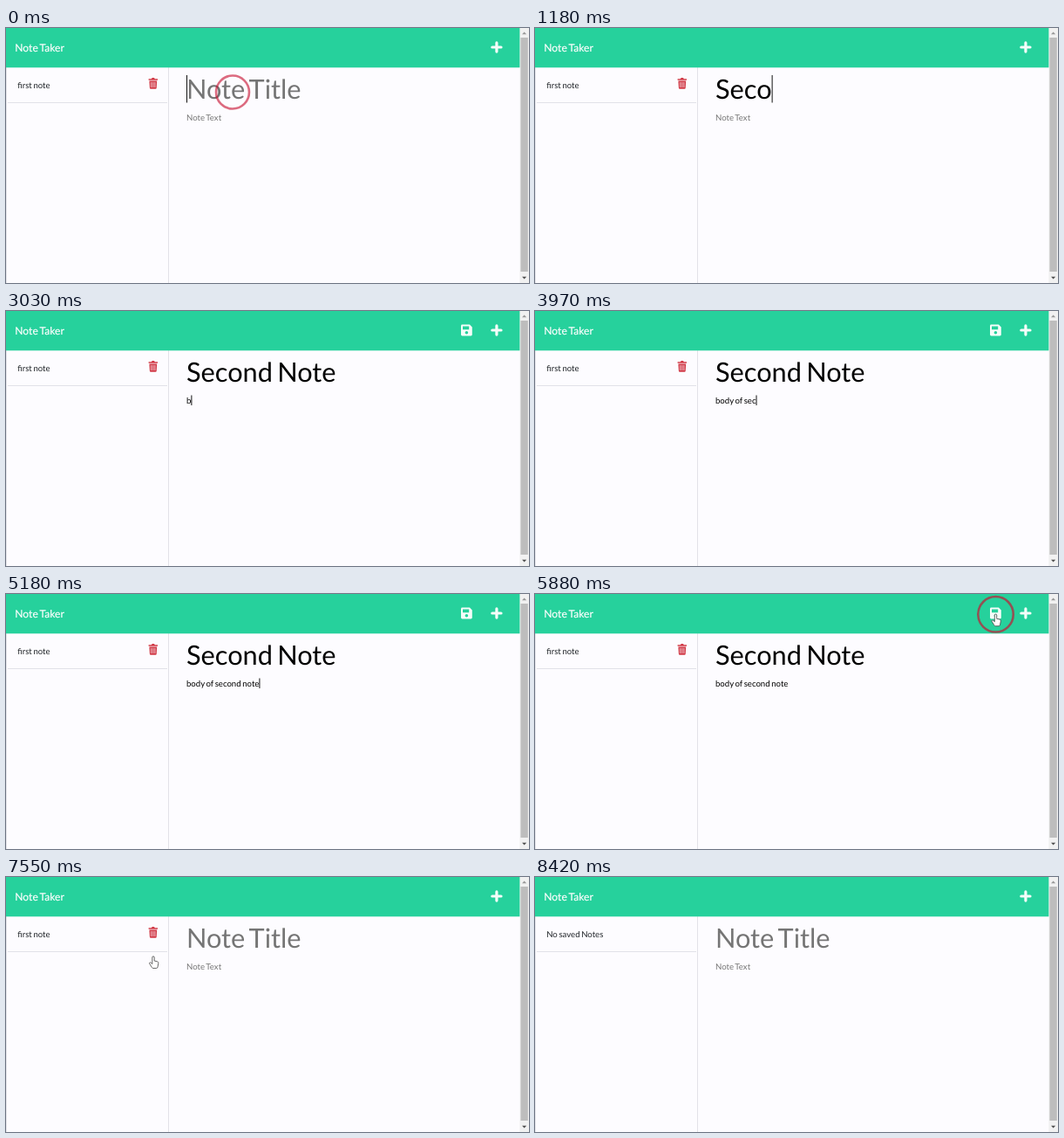
These frames come from a looping animation (600 by 292 pixels, 8450 ms). An HTML page:

```html
<!DOCTYPE html>
<html lang="en">
<head>
<meta charset="utf-8">
<title>Note Taker</title>
<style>
html, body { margin: 0; width: 100%; height: 100%; overflow: hidden; background: #fdfcff; }
svg { display: block; width: 600px; height: 292px; }
text { font: 9.6px Lato, sans-serif; word-spacing: -.085em; white-space: pre; text-rendering: geometricPrecision; fill: #212529; }
#title { font-size: 30.72px; }
.brand { font-size: 12.1px; fill: #fff; stroke: #fff; stroke-width: .2; }
.line { stroke: #e2e2e8; }
</style>
</head>
<body>
<svg viewBox="0 0 600 292">
  <defs>
    <g id="trash">
      <path fill="#d23c49" d="M0 1.2h3.2l.8-1.2h2.4l.8 1.2h3.2v1.5h-10.4zM.8 3.5h8.8l-.5 8.2q-.1 1-1.1 1h-5.6q-1 0-1.1-1z"/>
      <path stroke="#fdfcff" stroke-width=".7" d="M3.1 5v6M5.2 5v6M7.3 5v6"/>
    </g>
  </defs>
  <rect width="600" height="292" fill="#fdfcff"/>
  <path class="line" d="M.5 45V292M186.5 45V292M2 85.5H185"/>
  <rect x="589.4" width="10.6" height="292" fill="#f1f1f1"/>
  <rect x="590.4" y="11" width="8.4" height="268" fill="#bdbdbd"/>
  <path fill="#999" d="M592 7.2l2.6-2.8 2.6 2.8z"/>
  <path fill="#505050" d="M592 284.8l2.6 2.8 2.6-2.8z"/>

  <rect width="589.4" height="45.3" fill="#26d19c"/>
  <text class="brand" x="10.3" y="26.5">Note Taker</text>
  <path stroke="#f4fdf9" stroke-width="3.2" stroke-linecap="round" d="M557.8 22H568M562.9 16.9V27.1"/>
  <path id="save" fill="#f4fdf9" fill-rule="evenodd" transform="translate(522 15.6)" d="M1.4 0h8.6l2.8 2.8v8.6a1.4 1.4 0 0 1-1.4 1.4h-10a1.4 1.4 0 0 1-1.4-1.4v-10a1.4 1.4 0 0 1 1.4-1.4zM2 2v3.6h7.2v-3.6zM4.6 9.1a1.8 1.8 0 1 0 3.6 0a1.8 1.8 0 1 0-3.6 0z"/>

  <text id="first" x="13.2" y="69"></text>
  <use id="firstBin" href="#trash" x="163.6" y="57"/>
  <g id="second">
    <text x="13.2" y="109.2">Second Note</text>
    <use href="#trash" x="163.6" y="97.3"/>
    <path class="line" d="M2 126H185"/>
  </g>

  <text id="title" x="207" y="80.6"></text>
  <text id="body" x="207" y="106"></text>
  <rect id="caret" width="1" fill="#111"/>

  <circle id="ring" fill="none" stroke="#c81432" stroke-width="2.6"/>
  <g id="cursor" fill="#fff" stroke="#444" stroke-width=".8" stroke-linejoin="round">
    <path id="hand" d="M-1.2 1a1.2 1.2 0 0 1 2.4 0v4l3.4.7q1.4.4 1.2 1.9l-.7 4.1q-.3 1.7-1.4 1.7h-3.8q-1 0-1.6-1l-2.6-4.2q-.5-1 .4-1.4.8-.2 1.5.6l1.2 1.1z"/>
    <path id="arrow" d="M0 0v11l2.5-2.4 1.7 3.8 1.6-.7-1.7-3.7h3.5z"/>
  </g>
</svg>
<script>
// All times in ms
const LOOP = 8450, BLINK = 530, KEY = 95, MOVE = 380, PRESS = 220;
const FOCUS = -120, TAB = 2790, BLUR = 5700, CLEAR = 5960, SAVED = 6060, DROP_SECOND = 7440, DROP_FIRST = 8040;

// Bursts of typing: text and time of the first key
const titleBursts = [["Second ", 880], ["Note", 1600]];
const bodyBursts = [["body of s", 2940], ["econ", 3850], ["d note", 4270]];

const field = { x: 260, y: 73.5 }, disk = { x: 528.5, y: 23.3 }, list = { x: 176, y: 115.5 };
const bin1 = { x: 169, y: 65 }, bin2 = { x: 169, y: 105 };
const moves = [[5180, disk], [6100, list], [6850, bin2], [7400, bin1], [7960, field]];
const clicks = [[FOCUS, field], [5810, disk], [7220, bin2], [7790, bin1]];

const $ = id => document.getElementById(id);
const show = (id, on) => $(id).style.display = on ? "" : "none";
const set = (id, attrs) => Object.entries(attrs).forEach(([k, v]) => $(id).setAttribute(k, v));
const clamp = (v, lo, hi) => Math.min(hi, Math.max(lo, v));
const mix = (a, b, u) => a + (b - a) * u;

function type(bursts, t, focus) {
  let text = "", last = focus;
  for (const [s, start] of bursts) {
    const n = clamp(Math.floor((t - start) / KEY) + 1, 0, s.length);
    text += s.slice(0, n);
    if (n) last = start + (n - 1) * KEY;
  }
  return { text, last };
}

function drawField(id, value, placeholder) {
  $(id).textContent = value || placeholder;
  $(id).style.fill = value ? "#000" : "#757575";
}

function drawCaret(t, inTitle, { text, last }) {
  const on = t < BLUR && Math.floor((t - last) / BLINK) % 2 === 0;
  show("caret", on);
  if (!on) return;
  const width = text ? $(inTitle ? "title" : "body").getComputedTextLength() : 0;
  set("caret", { x: 207 + width, y: inTitle ? 54 : 96.5, height: inTitle ? 31.5 : 11.5 });
}

function drawRing(t) {
  const click = clicks.find(([start]) => t >= start && t < start + PRESS);
  show("ring", click);
  if (!click) return;
  const [start, { x, y }] = click, u = (t - start) / PRESS;
  set("ring", { cx: x, cy: y, r: 22 - 5.5 * u, opacity: 0.68 * (1 - u ** 4) });
}

function drawCursor(t) {
  let { x, y } = field;
  for (const [start, to] of moves) {
    const u = clamp((t - start) / MOVE, 0, 1), e = u * u * (3 - 2 * u);
    x = mix(x, to.x, e);
    y = mix(y, to.y, e);
  }
  const header = y < 45, hand = header ? x > 515 : x < 187;
  show("cursor", header || x < 202); // not visible over the text fields
  show("hand", hand);
  show("arrow", !hand);
  set("cursor", { transform: `translate(${x} ${y})` });
}

function draw(t) {
  const open = t < CLEAR, inTitle = t < TAB;
  const title = type(titleBursts, t, FOCUS), body = type(bodyBursts, t, TAB);
  drawField("title", open && title.text, "Note Title");
  drawField("body", open && body.text, "Note Text");
  show("save", open && body.text);
  show("second", t >= SAVED && t < DROP_SECOND);
  show("firstBin", t < DROP_FIRST);
  $("first").textContent = t < DROP_FIRST ? "first note" : "No saved Notes";
  drawCaret(t, inTitle, inTitle ? title : body);
  drawRing(t);
  drawCursor(t);
}

const start = performance.now();
function tick() {
  draw((performance.now() - start) % LOOP);
  requestAnimationFrame(tick);
}
tick();
</script>
</body>
</html>
```
